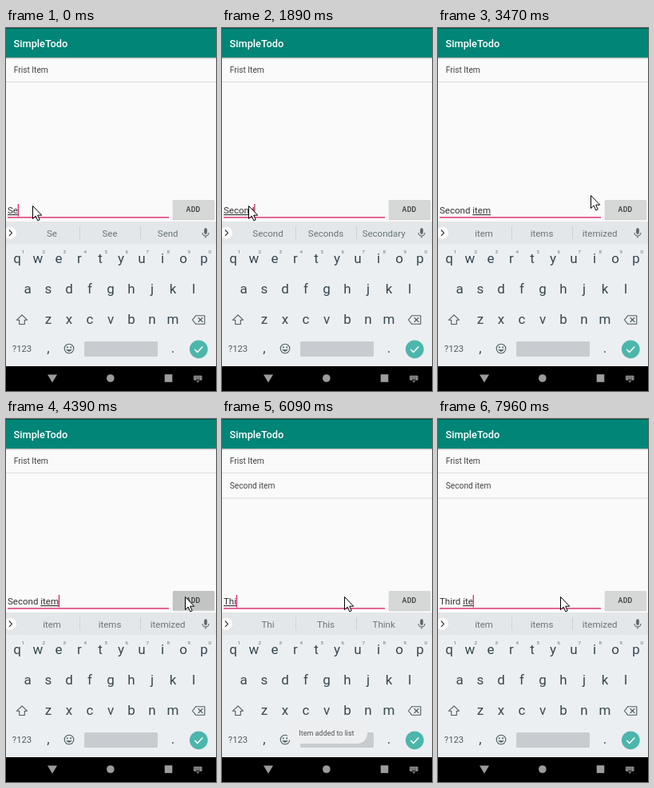
These frames come from a looping animation (263 by 454 pixels, 8 s). An HTML page:

```html
<!DOCTYPE html>
<html lang="en">
<head>
<meta charset="utf-8">
<title>Todo list</title>
<style>
html, body { margin: 0; width: 100%; height: 100%; overflow: hidden; background: #fafafa; }
svg { display: block; width: 263px; height: 454px; }
text { font-family: Roboto, sans-serif; white-space: pre; }
.item { font-size: 10.2px; fill: #444; }
.field { font-size: 11.52px; fill: #333; }
.mid { text-anchor: middle; }
.key { font-size: 17px; fill: #37474f; }
.digit { font-size: 6.2px; fill: #607078; }
.sug { font-size: 11.5px; fill: #69747a; }
.line { fill: none; stroke: #4d5b62; stroke-width: 1.1; stroke-linejoin: round; stroke-linecap: round; }
#word { text-decoration: underline; text-decoration-thickness: .8px; text-underline-offset: 1.5px; }
</style>
</head>
<body>
<svg viewBox="0 0 263 454">
  <defs>
    <linearGradient id="shade" x2="0" y2="1">
      <stop stop-color="#000" stop-opacity=".25"/><stop offset="1" stop-color="#000" stop-opacity="0"/>
    </linearGradient>
  </defs>
  <rect width="263" height="454" fill="#fafafa"/>
  <rect width="263" height="37" fill="#008577"/>
  <rect width="263" height="1" fill="#00574b"/>
  <rect y="37" width="263" height="2.5" fill="url(#shade)"/>
  <text x="9.5" y="24" font-size="12.8" font-weight="500" fill="#fff">SimpleTodo</text>

  <text class="item" x="9.8" y="55.8">Frist Item</text>
  <rect y="67" width="263" height="1" fill="#dedede"/>
  <g id="added">
    <text class="item" x="9.8" y="87.3">Second item</text>
    <rect y="98.5" width="263" height="1" fill="#dedede"/>
  </g>

  <rect x="2" y="236.3" width="202" height="1.3" fill="#d81b60"/>
  <text id="hint" class="field" x="2" y="232" style="fill:#a3a3a3">Add New Item Here</text>
  <text id="entry" class="field" x="2" y="232"><tspan id="before"></tspan><tspan id="word"></tspan></text>
  <rect id="caret" y="220" width="1.2" height="15.5" fill="#d81b60"/>
  <rect x="208.7" y="215.8" width="52.6" height="24.4" rx="1.5" fill="#000" opacity=".16"/>
  <rect id="button" x="209" y="215" width="52" height="24" rx="1.3"/>
  <text class="mid" x="234.6" y="230.2" font-size="8.7" font-weight="500" letter-spacing=".3" fill="#333">ADD</text>

  <rect y="242" width="263" height="181" fill="#eceff1"/>
  <rect y="242" width="263" height="28" fill="#e4e7e9"/>
  <path d="M92.5 248V264M168.5 248V264" stroke="#cdd2d5"/>
  <circle cx="5.5" cy="256.3" r="7.5" fill="#fff"/>
  <path class="line" d="M4.2 253l3.3 3.3-3.3 3.3" style="stroke:#333;stroke-width:1.2"/>
  <text class="sug mid" x="57.5" y="261"></text>
  <text class="sug mid" x="130" y="261"></text>
  <text class="sug mid" x="202.7" y="261"></text>
  <g fill="#59656b">
    <rect x="248.2" y="250.3" width="3.6" height="7.6" rx="1.8"/>
    <path d="M246 256a4 4 0 0 0 8 0M250 260v2.4" fill="none" stroke="#59656b" stroke-width="1.1"/>
  </g>

  <g id="keys"></g>
  <path class="line" d="M20 358.8l6.5 6.4h-3.2v5.3h-6.6v-5.3h-3.2z"/>
  <path class="line" d="M233.5 365l4.3-5.3h11v10.6h-11zM241 362.5l5 5m0-5l-5 5"/>
  <text class="mid" x="20" y="405.3" font-size="11.3" fill="#4d5b62">?123</text>
  <circle class="line" cx="79" cy="401" r="5.8"/>
  <path class="line" d="M75.8 402.5q3.2 4 6.4 0z" style="fill:#4d5b62;stroke-width:.5"/>
  <circle cx="76.9" cy="399.3" r="1"  fill="#4d5b62"/><circle cx="81.1" cy="399.3" r="1" fill="#4d5b62"/>
  <rect x="98" y="392" width="92" height="19" rx="1.5" fill="#c8ccd0"/>
  <circle cx="241.3" cy="401.8" r="11.4" fill="#4db6ac"/>
  <path d="M236.3 402l3.4 3.4 6.6-6.8" fill="none" stroke="#fff" stroke-width="1.5"/>

  <g id="toast">
    <rect x="81.5" y="380.5" width="100.5" height="25.5" rx="12.7" fill="#eceef0"/>
    <text x="96.3" y="396" font-size="8.96" fill="#555">Item added to list</text>
  </g>

  <rect y="423" width="263" height="31" fill="#000"/>
  <g fill="#9c9c9c">
    <path d="M52 433.5h12l-6 10z"/>
    <circle cx="130.8" cy="438" r="4.8"/>
    <rect x="198.7" y="433.2" width="9.6" height="9.6"/>
    <rect x="235" y="434.7" width="10.5" height="5.8" rx=".8"/>
    <path d="M238.3 441.5h4l-2 2z"/>
    <path d="M236 436.3h8.6M236 438h8.6" stroke="#000" stroke-width=".8" stroke-dasharray="1"/>
    <path d="M238 439.6h4.6" stroke="#000" stroke-width=".7"/>
  </g>

  <path id="mouse" d="M.5 .5V16.6L4.2 13.1 6.8 18.9 9.2 17.8 6.7 12.2H11.7z" fill="#fff" stroke="#000"/>
</svg>
<script>
const LOOP = 8000;
const $ = id => document.getElementById(id);
const sugs = document.querySelectorAll('.sug');

const put = (cls, x, y, s) =>
  $('keys').insertAdjacentHTML('beforeend', `<text class="${cls} mid" x="${x}" y="${y}">${s}</text>`);
const row = (chars, x, y) => [...chars].forEach((c, i) => put('key', x + i * 26, y, c));
row('qwertyuiop', 14, 294.3);
row('asdfghjkl', 27, 332.2);
row('zxcvbnm', 53, 370.3);
put('key', 53, 405.5, ',');
put('key', 209, 405.5, '.');
[...'1234567890'].forEach((c, i) => put('digit', 21.3 + i * 26, 281.7, c));

// Each step changes only the listed properties.
const steps = [
  [0, { text: 'Se', sug: 'Se|See|Send', caret: 1, mouse: [33, 222], added: 0, toast: 0, press: 0 }],
  [380, { text: 'Sec' }],
  [530, { sug: 'Sec|SEC|Second' }],
  [1080, { caret: 0 }],
  [1330, { text: 'Seco', caret: 1, sug: 'Seco|Second|Seconds' }],
  [1480, { text: 'Secon', sug: 'Secon|Second|Seconds' }],
  [1890, { text: 'Second', sug: 'Second|Seconds|Secondary' }],
  [2050, { text: 'Second ' }],
  [2200, { sug: 'time|one|half' }],
  [2500, { text: 'Second it', sug: "it|it's|is" }],
  [2630, { text: 'Second ite', sug: 'item|items|itemized' }],
  [2760, { text: 'Second item' }],
  [2900, { mouse: [52, 220] }],
  [3040, { mouse: [98, 213] }],
  [3180, { mouse: [148, 206] }],
  [3320, { mouse: [180, 205] }],
  [3470, { mouse: [191, 209], caret: 0 }],
  [3620, { mouse: [200, 212], caret: 1 }],
  [3750, { mouse: [213, 217] }],
  [3880, { mouse: [221, 221] }],
  [4010, { mouse: [224, 222], caret: 0 }],
  [4390, { press: 1, caret: 1 }],
  [4530, { press: 0, text: '', added: 1 }],
  [4670, { mouse: [186, 222] }],
  [4810, { mouse: [153, 222] }],
  [5250, { toast: .6 }],
  [5390, { toast: 1, caret: 0 }],
  [5530, { text: 'T', caret: 1, sug: 'The|This|Thanks' }],
  [5680, { text: 'Th' }],
  [5820, { sug: 'Th|The|Thanks' }],
  [6090, { text: 'Thi', sug: 'Thi|This|Think' }],
  [6220, { text: 'Thir', sug: 'Thir|Third|Thirty' }],
  [6350, { text: 'Third' }],
  [6490, { sug: 'Third|Thirds|Thirty' }],
  [6800, { text: 'Third ', toast: .6 }],
  [6950, { toast: .2, sug: 'time|one|day' }],
  [7100, { toast: 0 }],
  [7550, { text: 'Third i', sug: 'I|in|is' }],
  [7690, { text: 'Third it', sug: "it|it's|is" }],
  [7830, { text: 'Third ite' }],
  [7960, { sug: 'item|items|itemized' }]
];

function draw(t) {
  const s = Object.assign({}, ...steps.filter(p => p[0] <= t).map(p => p[1]));
  const cut = s.text.lastIndexOf(' ') + 1;
  $('before').textContent = s.text.slice(0, cut);
  $('word').textContent = s.text.slice(cut);
  $('hint').style.opacity = s.text ? 0 : 1;
  $('caret').setAttribute('x', 1.8 + (s.text ? $('entry').getComputedTextLength() : 0));
  $('caret').style.opacity = s.caret;
  s.sug.split('|').forEach((w, i) => sugs[i].textContent = w);
  $('mouse').setAttribute('transform', `translate(${s.mouse})`);
  $('added').style.opacity = s.added;
  $('toast').style.opacity = s.toast;
  $('button').style.fill = s.press ? '#c2c3c3' : '#d6d7d7';
}

const start = performance.now();
let last = -1;
function tick() {
  const t = (performance.now() - start) % LOOP;
  const n = steps.filter(p => p[0] <= t).length;
  if (n !== last) draw(t);
  last = n;
  requestAnimationFrame(tick);
}
tick();
</script>
</body>
</html>
```
